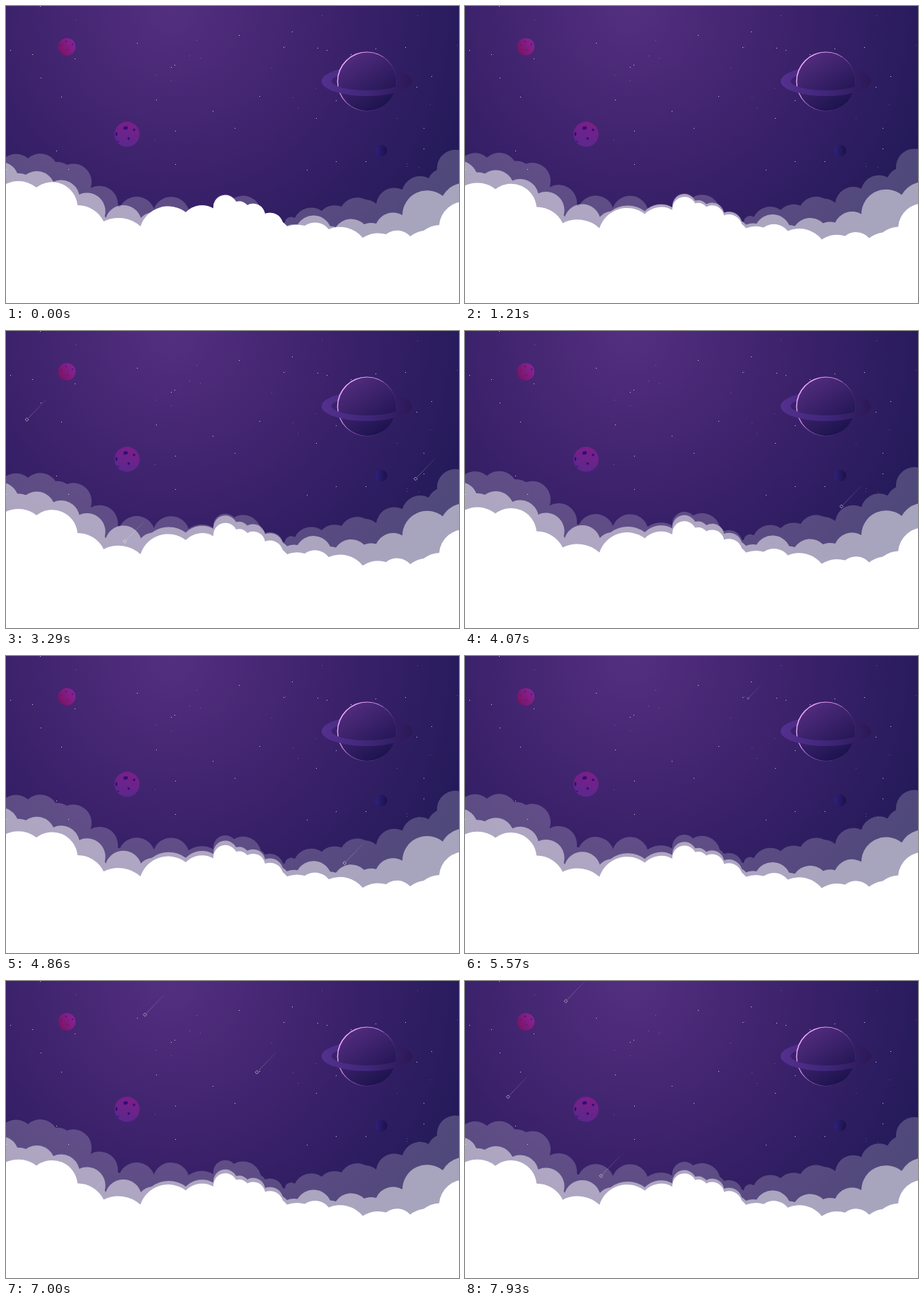
An HTML page for the animation above (8 s loop, 640 px wide and 419 px high).

```html
<!DOCTYPE html>
<html lang="en">
<head>
<meta charset="utf-8">
<title>Night sky above the clouds</title>
<style>
  html, body { margin: 0; width: 100%; height: 100%; overflow: hidden; background: #35205f; }
  svg { display: block; width: 100vw; height: 100vh; }
</style>
</head>
<body>
<svg viewBox="0 0 640 419" preserveAspectRatio="none">
  <defs>
    <radialGradient id="sky" gradientUnits="userSpaceOnUse" cx="235" cy="5" r="450">
      <stop offset="0" stop-color="#542f80"/>
      <stop offset=".5" stop-color="#3d226c"/>
      <stop offset="1" stop-color="#231a59"/>
    </radialGradient>
    <linearGradient id="red" x1="0" y1=".8" x2="1" y2=".2">
      <stop offset="0" stop-color="#7a1260"/>
      <stop offset="1" stop-color="#87259a"/>
    </linearGradient>
    <linearGradient id="violet" x1=".65" y1="0" x2=".4" y2="1">
      <stop offset="0" stop-color="#7d1e88"/>
      <stop offset="1" stop-color="#5a288c"/>
    </linearGradient>
    <linearGradient id="globe" x1=".25" y1=".1" x2=".75" y2=".9">
      <stop offset="0" stop-color="#4e2a7b"/>
      <stop offset="1" stop-color="#1e1450"/>
    </linearGradient>
    <linearGradient id="rim" x1=".05" y1=".2" x2=".85" y2=".8">
      <stop offset="0" stop-color="#f3adff"/>
      <stop offset=".4" stop-color="#d08ae8"/>
      <stop offset=".8" stop-color="#5a3590"/>
    </linearGradient>
    <linearGradient id="ring">
      <stop offset="0" stop-color="#54308f"/>
      <stop offset=".5" stop-color="#40277a"/>
      <stop offset="1" stop-color="#2c1856"/>
    </linearGradient>
    <linearGradient id="moon">
      <stop offset="0" stop-color="#30217d"/>
      <stop offset="1" stop-color="#1b1148"/>
    </linearGradient>
    <linearGradient id="tail" gradientUnits="userSpaceOnUse" x1="2" y1="-2" x2="27" y2="-28">
      <stop offset="0" stop-color="#fff" stop-opacity=".32"/>
      <stop offset="1" stop-color="#fff" stop-opacity=".1"/>
    </linearGradient>
    <clipPath id="frontHalf"><path d="M440 106H580V150H440Z"/></clipPath>
    <path id="band" fill="url(#ring)" fill-rule="evenodd"
      d="M446 106a64 21 0 0 1 128 0a64 21 0 0 1 -128 0M460 106a50 13 0 0 0 100 0a50 13 0 0 0 -100 0"/>
    <g id="meteor" fill="none">
      <path d="M2-2L27-28" stroke="url(#tail)" stroke-width=".8"/>
      <path d="M0-2.4L2.4 0L0 2.4L-2.4 0Z" stroke="#b3aab8" stroke-width=".9"/>
    </g>
  </defs>

  <rect width="640" height="419" fill="url(#sky)"/>
  <g id="stars" fill="#fff"></g>

  <g>
    <circle cx="86" cy="57.5" r="12.2" fill="url(#red)"/>
    <g fill="#5d1486">
      <circle cx="85" cy="50" r="1.3"/><circle cx="94" cy="54" r="1.2"/>
      <circle cx="87" cy="62" r="1"/><circle cx="78" cy="55" r="1"/>
    </g>
  </g>
  <g>
    <circle cx="171" cy="181" r="17.7" fill="url(#violet)"/>
    <g fill="#300d7c">
      <ellipse cx="169" cy="172" rx="3.2" ry="2.4" transform="rotate(-20 169 172)"/>
      <circle cx="181" cy="174.7" r="1.7"/><ellipse cx="156" cy="180.5" rx="1.3" ry="2.8"/>
      <circle cx="173.3" cy="187" r="1.7"/><circle cx="158.5" cy="191" r="1.1"/>
    </g>
  </g>
  <g>
    <use href="#band"/>
    <circle cx="509.7" cy="106.4" r="42" fill="url(#rim)"/>
    <circle cx="510.4" cy="106.8" r="41.2" fill="url(#globe)"/>
    <use href="#band" clip-path="url(#frontHalf)"/>
  </g>
  <circle cx="530" cy="204" r="8.5" fill="url(#moon)"/>

  <g id="meteors"></g>
  <g id="clouds" fill="#fff"></g>
</svg>
<script>
const LOOP = 8000, FPS = 14, GRAVITY = 9;

function add(parent, tag, attrs) {
  const node = document.createElementNS("http://www.w3.org/2000/svg", tag);
  for (const key in attrs) node.setAttribute(key, attrs[key]);
  return document.getElementById(parent).appendChild(node);
}

let seed = 7;
function random() {
  seed = seed * 16807 % 2147483647;
  return seed / 2147483647;
}
for (let i = 0; i < 58; i++) {
  add("stars", "rect", {
    x: Math.floor(random() * 640), y: Math.floor(random() * 250),
    width: 1, height: 1, opacity: i % 5 < 3 ? .75 : .25
  });
}

// A cloud edge is a row of arcs through the notches [x, y, radius];
// a notch without a radius takes that of its layer.
const ridge = [[293, 285.5, 32], [325, 276, 17], [341, 281, 16], [366, 293, 17], [391, 305, 19]];

const layers = [
  { opacity: .2, travel: -14, period: 12000, radius: 26, start: [-8, 221], notches: [
    [31, 215], [70, 220], [86, 224], [119.5, 257], [158, 283], [161, 284], [209, 286], [258, 287],
    ridge[0], [322, 271, 17], [360, 287], ...ridge.slice(3), [394, 306], [408, 299, 9],
    [446, 289], [474, 283], [508, 273], [523, 279], [560, 259], [597, 243], [609, 231], [659, 219]] },
  { opacity: .5, travel: -7, period: 8000, radius: 26, start: [-8, 220], notches: [
    [16, 236], [28, 238], [67, 248], [103.5, 266], [139.5, 296.5], [141, 299], [190.5, 299],
    [206, 291], [254, 291, 40], ...ridge, [397, 310], [412, 308.5], [458, 310.5], [466, 312],
    [506, 308], [523, 307], [560, 295], [617, 268, 35], [679, 302]] },
  { opacity: 1, travel: 5, period: 5000, radius: 41, start: [-8, 256], notches: [
    [43, 256], [101, 281, 36], [138, 304], [190, 311, 46], [254, 291], ...ridge, [397, 311],
    [422, 310], [456, 315, 25], [504, 327], [537, 322], [571, 325, 25], [590, 317],
    [612, 309], [684, 315, 36]] }
];
for (const layer of layers) {
  const arcs = layer.notches.map(([x, y, r = layer.radius]) => `A${r} ${r} 0 0 1 ${x} ${y}`);
  layer.node = add("clouds", "path", {
    d: `M${layer.start}${arcs.join("")}V460H-8Z`, opacity: layer.opacity
  });
}

// Each flight enters at (x, y) at the given seconds, falls at `speed` px/s
// and drifts left by `slant` px for every px of fall.
const meteors = [
  { x: 175.7, y: 0, starts: [1.79, 7.566], speed: 76.8, slant: 1.17 },
  { x: 497.4, y: 0, starts: [1.36, 6.138], speed: 145.5, slant: 1.11 },
  { x: 638, y: 159, starts: [2.07], speed: 35.2, slant: 1.2 },
  { x: 470, y: 0, starts: [5.19], speed: 155, slant: 1.17, scale: .65 },
  { x: 252, y: 0, starts: [6.6], speed: 117, slant: 1.17 }
];
for (const meteor of meteors) meteor.node = add("meteors", "use", { href: "#meteor" });

function draw(ms) {
  for (const { node, travel, period } of layers) {
    const lift = travel * (1 - Math.cos(2 * Math.PI * ms / period)) / 2;
    node.setAttribute("transform", `translate(0 ${lift})`);
  }
  const now = ms / 1000;
  for (const { node, x, y, starts, speed, slant, scale = 1 } of meteors) {
    const start = starts.findLast(s => s <= now) ?? starts[0];
    const age = now - start;
    const fall = speed * age + GRAVITY * age * age / 2;
    node.setAttribute("transform", `translate(${x - fall * slant} ${y + fall}) scale(${scale})`);
  }
}

const begin = performance.now();
function tick() {
  const ms = (performance.now() - begin) % LOOP;
  // Steps fall on a 10 ms grid, hence the half-grid offset.
  const step = Math.floor((ms + 5) * FPS / 1000) % (LOOP * FPS / 1000);
  draw(step * 1000 / FPS);
  requestAnimationFrame(tick);
}
tick();
</script>
</body>
</html>
```
